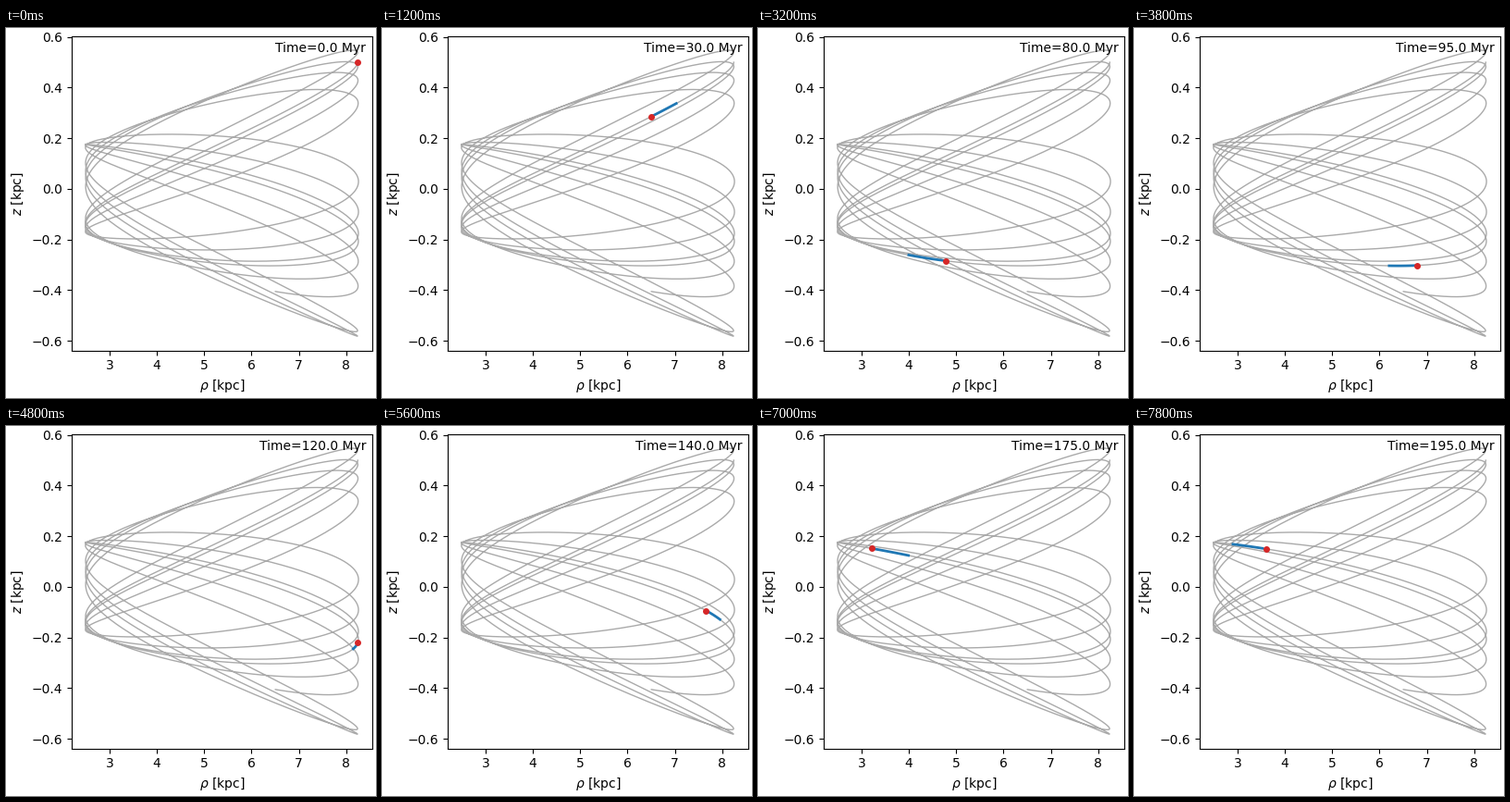
Animation, 400 px wide and 400 px high, one loop 8000 ms. Source, as a matplotlib script:

```python
import numpy as np
import matplotlib.pyplot as plt
from matplotlib.animation import FuncAnimation

KMS = 1.0227121e-3          # km/s in kpc/Myr
V_C = 200 * KMS             # circular velocity at the scale radius
R_S = 10.0                  # NFW scale radius, kpc
GM = V_C**2 * R_S / (np.log(2) - 0.5)

DT = 0.5                    # Myr
T_END = 1500
STRIDE = 10                 # steps per frame
TAIL = 10                   # steps in the trailing segment
FRAMES = 40


def accel(pos):
    r = np.sqrt(pos @ pos)
    x = r / R_S
    mass = GM * (np.log(1 + x) - x / (1 + x))
    return -mass * pos / r**3


def deriv(w):
    return np.concatenate([w[3:], accel(w[:3])])


def integrate(w, steps):
    """Fourth-order Runge-Kutta orbit, one row per time step."""
    path = [w]
    for _ in range(steps):
        k1 = deriv(w)
        k2 = deriv(w + DT / 2 * k1)
        k3 = deriv(w + DT / 2 * k2)
        k4 = deriv(w + DT * k3)
        w = w + DT / 6 * (k1 + 2 * k2 + 2 * k3 + k4)
        path.append(w)
    return np.array(path)


start = np.array([8, 2, 0.5, -20 * KMS, 80 * KMS, -3 * KMS])
orbit = integrate(start, int(T_END / DT))
rho = np.hypot(orbit[:, 0], orbit[:, 1])
z = orbit[:, 2]

fig, ax = plt.subplots(figsize=(4, 4), dpi=100, layout="constrained")
ax.plot(rho, z, color="#aaaaaa", linewidth=1, zorder=1)
ax.set_xlabel(r"$\rho$ [kpc]")
ax.set_ylabel("$z$ [kpc]")
ax.set_xlim(ax.get_xlim())
ax.set_ylim(ax.get_ylim())

tail, = ax.plot([], [], color="tab:blue", linewidth=2, zorder=2)
dot, = ax.plot([], [], "o", color="tab:red", markersize=4, zorder=3)
clock = ax.text(0.98, 0.98, "", transform=ax.transAxes, ha="right", va="top")


def update(frame):
    n = frame * STRIDE
    part = slice(max(0, n - TAIL), n)
    tail.set_data(rho[part], z[part])
    dot.set_data([rho[n]], [z[n]])
    clock.set_text(f"Time={n * DT:.1f} Myr")
    return tail, dot, clock


anim = FuncAnimation(fig, update, frames=FRAMES, interval=200,
                     repeat=True, repeat_delay=0)
plt.show()
```
